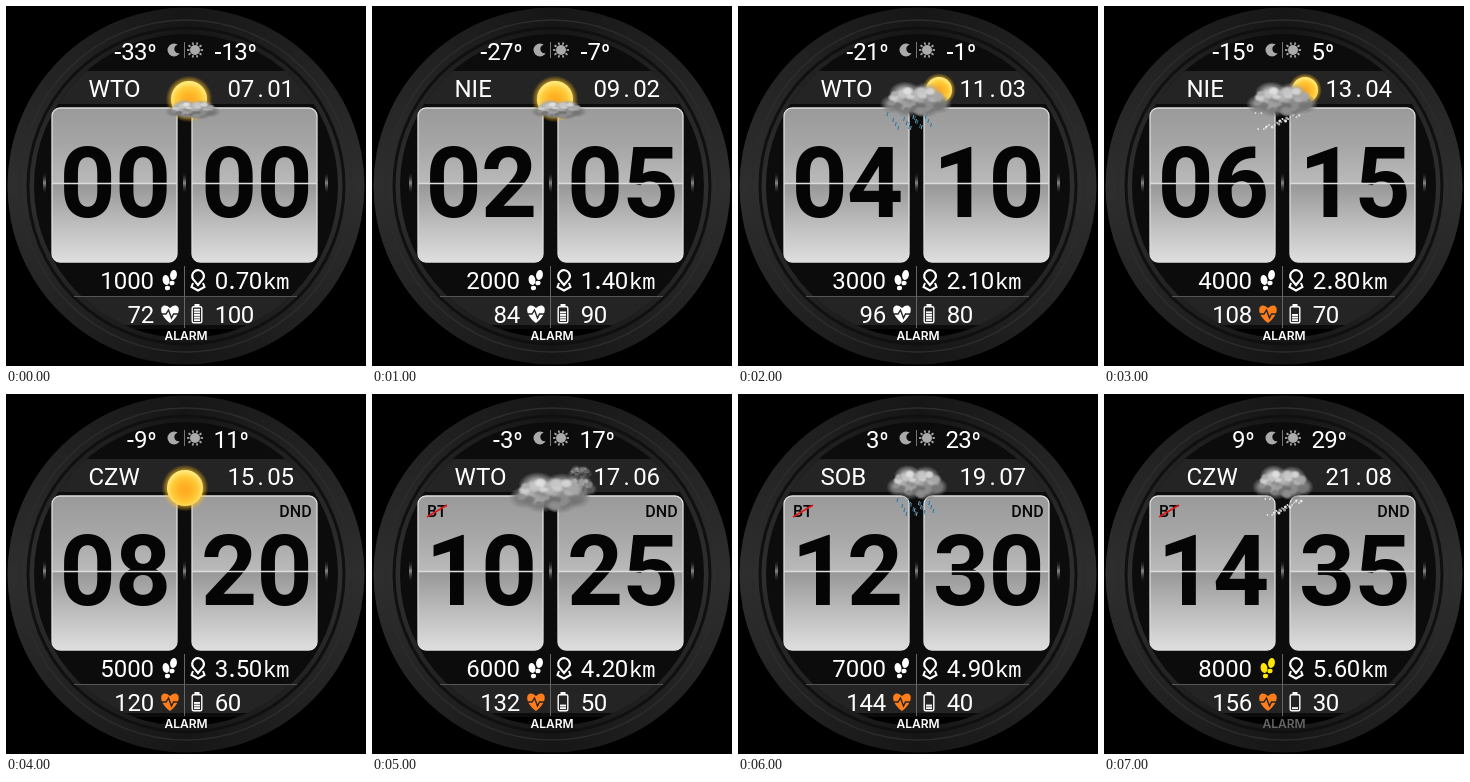
An HTML page with a canvas that plays this animation: 360 by 360 pixels, repeating every 8000 ms.

```html
<!DOCTYPE html>
<html lang="pl">
<head>
<meta charset="utf-8">
<style>
html, body { margin: 0; width: 100%; height: 100%; overflow: hidden; background: #000; }
canvas { display: block; }
</style>
</head>
<body>
<canvas id="stage" width="360" height="360"></canvas>
<script>
const ctx = document.getElementById('stage').getContext('2d');
const TAU = Math.PI * 2;
const STEP_MS = 1000;
const STEPS = 8;
const DAYS = ['WTO', 'NIE', 'WTO', 'NIE', 'CZW', 'WTO', 'SOB', 'CZW'];
const PUFFS = [[-.34, .1, .17], [.34, .1, .17], [-.16, -.1, .22], [.15, -.07, .23],
  [-.12, .14, .2], [.14, .15, .2]];
const pad = n => String(n).padStart(2, '0');

function disc(x, y, r, fill) {
  ctx.fillStyle = fill;
  ctx.beginPath();
  ctx.arc(x, y, r, 0, TAU);
  ctx.fill();
}

function ring(x, y, rx, ry, color, width = 1) {
  ctx.strokeStyle = color;
  ctx.lineWidth = width;
  ctx.beginPath();
  ctx.ellipse(x, y, rx, ry, 0, 0, TAU);
  ctx.stroke();
}

function polyline(points, color, width = 1) {
  ctx.strokeStyle = color;
  ctx.lineWidth = width;
  ctx.beginPath();
  points.forEach(p => ctx.lineTo(...p));
  ctx.stroke();
}

const line = (x1, y1, x2, y2, color, width) => polyline([[x1, y1], [x2, y2]], color, width);

function oval(x, y, rx, ry, angle, fill) {
  ctx.fillStyle = fill;
  ctx.beginPath();
  ctx.ellipse(x, y, rx, ry, angle, 0, TAU);
  ctx.fill();
}

function shade(gradient, ...colors) {
  colors.forEach((c, i) => gradient.addColorStop(i / (colors.length - 1), c));
  return gradient;
}

const vertical = (y1, y2, ...colors) => shade(ctx.createLinearGradient(0, y1, 0, y2), ...colors);
const radial = (x, y, r, ...colors) => shade(ctx.createRadialGradient(x, y, 0, x, y, r), ...colors);

function text(str, x, y, font, color = '#fff', align = 'left') {
  ctx.font = font;
  ctx.fillStyle = color;
  ctx.textAlign = align;
  ctx.fillText(str, x, y);
}

// Characters sit centred in equal cells, as on a fixed-pitch display.
function cells(str, x, y, pitch = 13) {
  [...str].forEach((c, i) =>
    text(c, x + (i + .5) * pitch, y, '24px Roboto, sans-serif', '#fff', 'center'));
}

function cellsRight(str, right, y, pitch) {
  cells(str, right - str.length * pitch, y, pitch);
}

function drawFace() {
  ctx.fillStyle = '#000';
  ctx.fillRect(0, 0, 360, 360);
  const metal = shade(ctx.createConicGradient(0, 180, 180), '#2e2e2e', '#161616', '#2e2e2e', '#161616', '#2e2e2e');
  disc(180, 180, 178.5, metal);
  ring(180, 180, 166, 166, '#2c2c2c', 1.5);
  ring(180, 180, 158, 158, '#101010', 3);
  disc(180, 180, 152, '#0c0c0c');

  ctx.save();
  ctx.beginPath();
  ctx.arc(180, 180, 152, 0, TAU);
  ctx.clip();
  ctx.fillStyle = '#242424';
  ctx.fillRect(28, 65, 304, 33);
  ctx.fillRect(28, 291, 304, 28);
  ctx.fillStyle = '#000';
  ctx.fillRect(28, 323, 304, 16);
  ctx.restore();

  line(68, 290.5, 291, 290.5, '#555');
  line(178.5, 260, 178.5, 322, '#666');
  for (const x of [38, 178, 320]) {
    ctx.fillStyle = vertical(165, 189, '#0000', '#888', '#0000');
    ctx.fillRect(x - 1, 165, 3, 24);
  }
}

function drawPanel(x, w) {
  const y = 102, h = 154, hinge = 177;
  ctx.save();
  ctx.beginPath();
  ctx.roundRect(x, y, w, h, 8);
  ctx.clip();
  ctx.fillStyle = vertical(y, hinge, '#9a9a9a', '#a6a6a6', '#bababa');
  ctx.fillRect(x, y, w, hinge - y);
  ctx.fillStyle = vertical(hinge, y + h, '#969696', '#bcbcbc', '#dedede');
  ctx.fillRect(x, hinge, w, y + h - hinge);
  ctx.restore();
  ctx.strokeStyle = '#dedede';
  ctx.lineWidth = 1.3;
  ctx.beginPath();
  ctx.roundRect(x, y, w, h, 8);
  ctx.stroke();
}

function drawDigits(str, left) {
  [...str].forEach((c, i) =>
    text(c, left + i * 55.5, 211, '700 98px Roboto, sans-serif', '#050505', 'center'));
}

function drawTemperature(low, high) {
  const degree = x => ring(x, 42, 2.5, 3.3, '#fff', 1.6);
  const pitch = 12.6, dash = 8;
  const width = v => String(Math.abs(v)).length * pitch + (v < 0 ? dash : 0);
  const signed = (value, x) => {
    if (value < 0) line(x + 1, 47, x + 7, 47, '#fff', 2);
    cellsRight(String(Math.abs(value)), x + width(value), 54, pitch);
    degree(x + width(value) + 5);
  };
  signed(low, 141 - width(low));
  signed(high, 208);

  disc(168, 44, 6.5, '#aaa');
  disc(172.5, 43, 4.2, '#0c0c0c');
  line(178.5, 36, 178.5, 52, '#777');
  disc(189, 44, 5, '#aaa');
  for (let i = 0; i < 10; i++) {
    const c = Math.cos(i * TAU / 10), s = Math.sin(i * TAU / 10);
    line(189 + c * 5.5, 44 + s * 5.5, 189 + c * 8, 44 + s * 8, '#aaa', 1.7);
  }
}

function sun(x, y, r) {
  disc(x, y, r * 1.3, radial(x, y, r * 1.3, '#ffd23c', '#ffd23c', '#ffd23c', '#ffc828a0', '#ffb41400'));
  disc(x, y, r, radial(x, y + r * .1, r * 1.1, '#ffa81c', '#ffb428', '#ffcb38', '#fff08c'));
}

// A soft body with small seeded billows, lit from above.
function cloud(x, y, w, h, light = 240, dark = 105) {
  ctx.save();
  ctx.translate(x, y);
  ctx.scale(w, h * 1.45);
  const puff = (px, py, r, lift) => {
    const v = Math.round(light + (dark - light) * Math.min(1, Math.max(0, (py + .3) / .6)) + lift);
    const tone = a => `rgba(${v},${v},${v},${a})`;
    disc(px, py, r, radial(px, py, r, tone(1), tone(.9), tone(0)));
  };
  PUFFS.forEach(([px, py, r]) => puff(px, py, r * 1.12, -25));
  for (let i = 0; i < 34; i++) {
    const a = i * 2.4, d = Math.sqrt((i + .5) / 34);
    puff(Math.cos(a) * d * .4, Math.sin(a) * d * .22 + .03, .07 + i % 3 * .02, i * 17 % 61 - 32);
  }
  ctx.restore();
}

function rain(x, y, w) {
  for (let i = 0; i < 26; i++) {
    const px = x + (i * .618 % 1 - .5) * w, py = y + (i * 7 % 15);
    line(px, py, px - 1, py + 4, i % 2 ? '#6fa9c9' : '#416f8d', 1);
  }
}

function snow(x, y, w) {
  for (let i = 0; i < 34; i++) {
    const py = y + (i * 7 % 18);
    disc(x + (i * .618 % 1 - .5) * w, py, i % 3 ? .9 : 1.5, i % 2 ? '#e4e4e4' : '#999');
  }
}

function partlySunny() {
  sun(183, 93, 18);
  cloud(187, 103, 53, 20);
}

function showers(fall) {
  sun(201, 84, 13);
  fall(173, 106, 46);
  cloud(178, 93, 68, 35);
}

function overcast() {
  cloud(208, 78, 24, 14, 150, 60);
  cloud(207, 92, 34, 22, 190, 80);
  cloud(178, 98, 78, 40);
}

function downfall(fall) {
  fall(179, 104, 38);
  cloud(179, 88, 58, 34);
}

const WEATHER = [partlySunny, partlySunny, () => showers(rain), () => showers(snow),
  () => sun(179, 94, 18), overcast, () => downfall(rain), () => downfall(snow)];

function drawFootprints(color) {
  oval(167.5, 269, 3.4, 5, .15, color);
  oval(166, 277, 2.6, 2.3, 0, color);
  oval(160, 274, 3.4, 5, -.15, color);
  oval(161.5, 282, 2.6, 2.3, 0, color);
}

function drawPin() {
  ctx.strokeStyle = '#fff';
  ctx.lineWidth = 2.2;
  ctx.beginPath();
  ctx.arc(192, 270, 5.8, Math.PI * .8, Math.PI * 2.2);
  ctx.lineTo(192, 279);
  ctx.closePath();
  ctx.stroke();
  polyline([[187, 277], [185.5, 281], [192, 284.5], [198.5, 281], [197, 277]], '#fff', 2);
}

function drawHeart(color) {
  ctx.fillStyle = color;
  ctx.beginPath();
  ctx.moveTo(164, 317);
  ctx.bezierCurveTo(149.5, 306, 155.5, 294, 164, 302);
  ctx.bezierCurveTo(172.5, 294, 178.5, 306, 164, 317);
  ctx.fill();
  polyline([[154, 308], [160, 308], [162.5, 304], [165.5, 312], [167.5, 308], [174, 308]], '#242424', 1.4);
}

function drawBattery(level) {
  ctx.fillStyle = '#fff';
  ctx.fillRect(188.5, 298, 5, 2);
  ctx.strokeStyle = '#fff';
  ctx.lineWidth = 1.4;
  ctx.beginPath();
  ctx.roundRect(186.2, 300.7, 9.6, 16, 1.5);
  ctx.stroke();
  const bars = Math.floor(level / 20);
  for (let i = 0; i < bars; i++) ctx.fillRect(188, 313.2 - i * 2.6, 6, 1.9);
}

function drawAlerts(step) {
  const font = '500 16px Roboto, sans-serif';
  if (step >= 4) text('DND', 289.5, 123, font, '#080808', 'center');
  if (step >= 5) {
    text('BT', 55, 123, font, '#080808');
    line(55, 123, 75, 111, '#e01818', 1.8);
  }
  text('ALARM', 180, 333.5, '600 12px Inter, sans-serif', step === 7 ? '#666' : '#fff', 'center');
}

function drawDistance(km) {
  const [whole, part] = km.toFixed(2).split('.');
  cells(whole, 209, 283);
  text('.', 226, 283, '500 24px Roboto, sans-serif', '#fff', 'center');
  cells(part, 230, 283);
  text('km', 257, 283, '500 22px "Noto Sans Mono", monospace');
}

function draw(step) {
  drawFace();
  drawPanel(46, 125);
  drawPanel(186, 125);
  drawDigits(pad(step * 2), 81.5);
  drawDigits(pad(step * 5), 223);
  line(46, 177.5, 171, 177.5, '#dcdcdc', 1.3);
  line(186, 177.5, 311, 177.5, '#dcdcdc', 1.3);

  drawTemperature(-33 + step * 6, -13 + step * 6);
  text(DAYS[step], 82.5, 91, '24px Roboto, sans-serif');
  cells(`${pad(7 + step * 2)}.${pad(step + 1)}`, 221.5, 91, 13.3);
  WEATHER[step]();

  cellsRight(String(1000 * (step + 1)), 148, 283, 13.4);
  drawDistance(.7 * (step + 1));
  cellsRight(String(72 + step * 12), 148, 317, 13.2);
  cells(String(100 - step * 10), 209, 317);

  drawFootprints(step === 7 ? '#ffe600' : '#fff');
  drawPin();
  drawHeart(step >= 3 ? '#ff7d1a' : '#fff');
  drawBattery(100 - step * 10);
  drawAlerts(step);
}

const start = performance.now();
function tick() {
  draw(Math.floor((performance.now() - start) / STEP_MS) % STEPS);
  requestAnimationFrame(tick);
}
tick();
</script>
</body>
</html>
```
